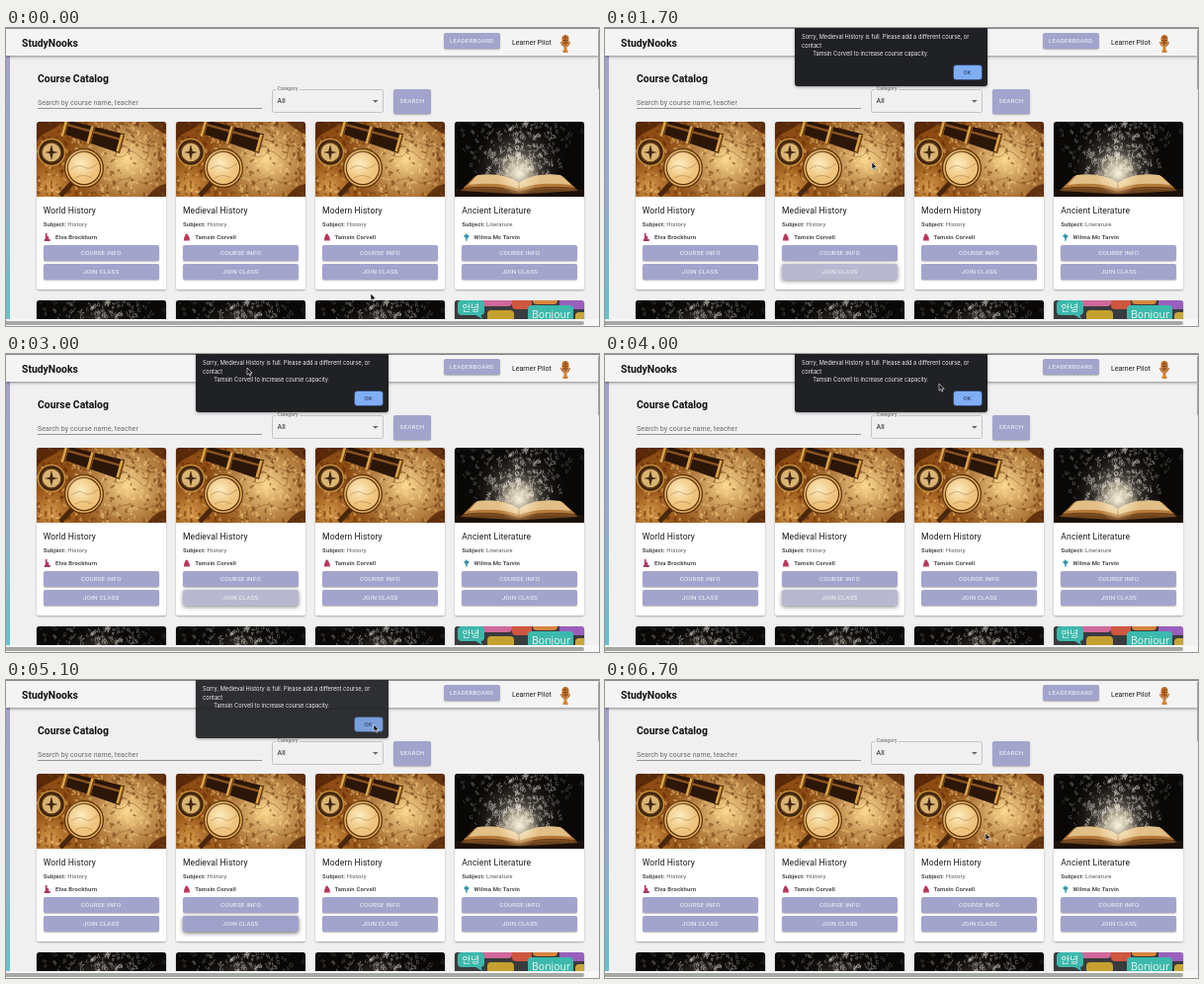
Recreate the animation shown at these times as an HTML page with a canvas. Size 600x302 px, loop 6.8 s.

```html
<!DOCTYPE html>
<html lang="en">
<head>
<meta charset="utf-8">
<title>Course catalog</title>
<style>
html, body { margin: 0; width: 100%; height: 100%; overflow: hidden; background: #f0f0f0; }
#stage { position: absolute; left: 0; top: 0; width: 600px; height: 302px; overflow: hidden;
  background: #f0f0f0; font-family: Roboto, "Liberation Sans", sans-serif; color: #1c1c1c; }
#stage div, #stage canvas, #stage svg { position: absolute; box-sizing: border-box; }
.t { white-space: pre; line-height: 10px; height: 10px; }
.head { left: 0; top: 0; width: 600px; height: 28px; background: #f4f4f4;
  border-top: 1px solid #8d8d8d; box-shadow: 0 1px 3px rgba(0,0,0,.45); }
.side { left: 0; top: 28px; width: 4px; height: 267px;
  background: linear-gradient(#a3a2cc, #97abd0 50%, #62c2cd); }
.h { font-size: 10.4px; font-weight: 700; color: #111; }
.btn { background: #a3a4cc; color: #f6f6fc; border-radius: 2px; display: flex;
  align-items: center; justify-content: center; font-size: 6.25px;
  letter-spacing: .0286em; box-shadow: 0 1px 1.5px rgba(0,0,0,.28); }
.btn.hover { background: #9a9bc5; box-shadow: 0 1px 3px rgba(0,0,0,.5); }
.btn.ripple { background: #b8b8d0; box-shadow: 0 1.5px 4px rgba(0,0,0,.45); }
.btn.focus { background: #a0a1ca; box-shadow: 0 1.5px 4px rgba(0,0,0,.55); }
.card { width: 131px; height: 170px; background: #fff; border-radius: 2.5px; overflow: hidden; }
.cardbox { width: 131px; height: 170px; border-radius: 2.5px; box-shadow: 0 1px 2px rgba(0,0,0,.32); }
.title { font-size: 8.6px; letter-spacing: .12px; }
.small { font-size: 6px; letter-spacing: .12px; color: #565656; }
.small b { color: #4c4c4c; }
.field { font-size: 7px; letter-spacing: .09px; }
.select { left: 268.5px; top: 62px; width: 113px; height: 24px; border: 1px solid #c4c4c4; border-radius: 2.5px; }
#dialog { left: 192px; top: 0; width: 195px; height: 58.5px; background: #202124;
  border-radius: 0 0 3px 3px; box-shadow: 0 1px 3px rgba(0,0,0,.35); color: #eee; }
#dialog .t { font: 5.7px/10px Inter, "Open Sans", sans-serif; }
#ok { left: 160.5px; top: 38px; width: 28px; height: 14px; border-radius: 2.5px; background: #80aef5;
  box-shadow: 0 0 0 .7px #3f5f93; color: #20304c; font-size: 6px; line-height: 14px; text-align: center; }
#ok.down { background: #7299d8; }
.foot { left: 0; top: 295px; width: 600px; height: 7px; background: #f7f7f7; }
.thumb { background: #a6a8a6; border-radius: 2px; }
#arrow, #hand { left: 0; top: 0; overflow: visible; }
</style>
</head>
<body>
<div id="stage"></div>
<script>
const stage = document.getElementById('stage');
const box = (cls, x, y, w, h, inner = '', extra = '') =>
  `<div class="${cls}" style="left:${x}px;top:${y}px;width:${w}px;height:${h}px" ${extra}>${inner}</div>`;
// Text is placed by its baseline.
const text = (cls, x, base, s, style = '') =>
  `<div class="t ${cls}" style="left:${x}px;top:${base - 7.5}px;${style}">${s}</div>`;

const courses = [
  ['World History', 'History', 'Elva Brockhurn', 'map'],
  ['Medieval History', 'History', 'Tamsin Corvell', 'map'],
  ['Modern History', 'History', 'Tamsin Corvell', 'map'],
  ['Ancient Literature', 'Literature', 'Wilma Mc Tarvin', 'book'],
];
const cardX = i => 30.7 + i * 141.2;
const figures = [
  '<path d="M2 0h2v3l2 1v3h1v2H1V7l1-1z" fill="#b8385f"/><path d="M1 7h7v1.5H1z" fill="#a03458"/>',
  '<path d="M4 .5q2 0 2 2 1.8 1.5 1.8 5.8H1q0-4 1.5-5.8Q2.5.5 4 .5z" fill="#c03a5c"/><path d="M2 5h5v1H2z" fill="#903050"/>',
  '<path d="M4 0l1.5 2L8 3 5.5 5.5 5 9H4L3.5 5.5 1 3l2-1z" fill="#2b9aa3"/><path d="M3.5 3h2v2h-2z" fill="#5a7fb8"/>',
];

function cardHtml([title, subject, teacher, photo], i) {
  const figure = figures[[0, 1, 1, 2][i]];
  return box('cardbox', cardX(i), 95, 131, 170) + box('card', cardX(i), 95, 131, 170,
    `<canvas data-photo="${photo}" width="131" height="76" style="left:0;top:0"></canvas>` +
    text('title', 7, 92.8, title) +
    text('small', 7, 106.6, `<b>Subject:</b> ${subject}`) +
    `<svg width="8" height="8" viewBox="0 0 9 9" style="left:7.5px;top:113px">${figure}</svg>` +
    text('small', 19.3, 119, `<b>${teacher}</b>`) +
    box('btn', 7, 125, 117, 16, 'COURSE INFO') +
    box('btn', 7, 144, 117, 16, 'JOIN CLASS', i === 1 ? 'id="join"' : ''));
}

const lowerCard = (_, i) => box('cardbox', cardX(i), 276, 131, 170) + box('card', cardX(i), 276, 131, 170,
  `<canvas data-photo="${i < 3 ? 'book' : 'talk'}" width="131" height="76" style="left:0;top:0"></canvas>`);

stage.innerHTML =
  '<div class="side"></div><div class="head"></div>' +
  text('h', 16, 18, 'StudyNooks') +
  box('btn', 442.5, 4.6, 57.5, 16, 'LEADERBOARD') +
  text('', 512, 17.3, 'Learner Pilot', 'font-size:7.05px') +
  `<svg width="14" height="20" style="left:559px;top:6px">
    <rect x="3.5" y="1" width="7" height="11" rx="3.5" fill="#cf7a2a"/>
    <path d="M4 4h6M4 6.5h6M4 9h6M7 1v11" stroke="#7d4219" stroke-width=".8"/>
    <path d="M2.5 8q1 5 4.5 5t4.5-5" fill="none" stroke="#a85b20" stroke-width="1.1"/>
    <path d="M5.5 12.5h3v4h1V19h-5v-2.500h1z" fill="#d5812f"/></svg>` +
  text('h', 32, 54.4, 'Course Catalog') +
  text('field', 32, 78, 'Search by course name, teacher', 'color:#696969') +
  '<div style="left:32px;top:81px;width:227px;height:1px;background:#949494"></div>' +
  '<div class="select"></div>' +
  text('', 273, 63.7, 'Category', 'font-size:5.25px;color:#666;background:#f0f0f0;padding:0 1.5px') +
  text('field', 274.5, 76.8, 'All') +
  '<svg width="6" height="3" style="left:371px;top:73px"><path d="M0 0h5.6L2.8 2.8z" fill="#666"/></svg>' +
  box('btn', 392, 62, 38, 24.5, 'SEARCH') +
  courses.map(cardHtml).join('') + courses.map(lowerCard).join('') +
  '<div class="foot"></div>' +
  box('thumb', 598.5, 2, 1.5, 60) + box('thumb', -2, 297, 587, 3.5) +
  `<div id="dialog">${
    text('', 7, 11.3, 'Sorry, Medieval History is full. Please add a different course, or')}${
    text('', 7, 20.1, 'contact')}${
    text('', 18.3, 28.9, 'Tamsin Corvell to increase course capacity.')}<div id="ok">OK</div></div>` +
  `<svg id="arrow" width="8" height="10"><path d="M0 0V7.2L1.7 5.7 2.8 8.2 4 7.7 2.9 5.3H5.2z"
    fill="#111" stroke="#fff" stroke-width=".6"/></svg>
  <svg id="hand" width="9" height="10"><path d="M1.8.5q.9-.4 1 .6v2.500l2.500.4q1.500.3 1.300 1.800L6 8.500H2.500L.2 5.500q.3-1 1.500-.1z"
    fill="#fff" stroke="#111" stroke-width=".7"/></svg>`;

function seeded(seed) {
  return () => (seed = (seed * 16807) % 2147483647) / 2147483647;
}
function disc(c, x, y, r, fill, line, width) {
  c.beginPath();
  c.arc(x, y, r, 0, 7);
  if (fill) { c.fillStyle = fill; c.fill(); }
  if (line) { c.strokeStyle = line; c.lineWidth = width; c.stroke(); }
}
function shape(c, fill, d) {
  c.fillStyle = fill;
  c.fill(new Path2D(d));
}
function stroke(c, color, width, d) {
  c.strokeStyle = color;
  c.lineWidth = width;
  c.stroke(new Path2D(d));
}
function glow(c, x, y, r, inner, outer) {
  const g = c.createRadialGradient(x, y, 0, x, y, r);
  g.addColorStop(0, inner);
  g.addColorStop(1, outer);
  c.fillStyle = g;
  c.fillRect(0, 0, 131, 76);
}

const photos = {
  map(c) {
    const rnd = seeded(41);
    c.fillStyle = '#c98532';
    c.fillRect(0, 0, 131, 76);
    glow(c, 92, 38, 60, 'rgba(255,222,150,.95)', 'rgba(115,52,6,.7)');
    glow(c, 14, 66, 34, 'rgba(250,195,105,.7)', 'rgba(200,120,40,0)');
    for (let i = 0; i < 420; i++) {
      const x = rnd() * 131, y = rnd() * 76, edge = Math.hypot((x - 88) / 60, (y - 38) / 42);
      c.fillStyle = rnd() < .25 + edge * .35 ? 'rgba(92,38,4,.45)' : 'rgba(255,222,145,.4)';
      c.beginPath();
      c.ellipse(x, y, .6 + rnd() * 2.6, .5 + rnd() * 1.2, rnd() * 3, 0, 7);
      c.fill();
    }
    stroke(c, 'rgba(108,57,15,.55)', .7, 'M77 34q10 4 14-2t13 3 9-4 17 1M76 65q14-12 25-5t29-8M92 3q4 16 17 20t21-3');
    shape(c, 'rgba(70,28,4,.7)', 'M112 0h19v13q-9-4-19-13zM112 76q9-12 19-13v13zM0 0h30L4 14 0 20z');
    // Spyglass
    c.save();
    c.translate(29, -2);
    c.rotate(.27);
    shape(c, '#2b1608', 'M0 0L62-2V18L0 14z');
    shape(c, '#8a5320', 'M0 3H62V5.500H0z');
    for (const x of [0, 27, 58]) {
      shape(c, '#dba548', `M${x}-1h4v18h-4z`);
      shape(c, '#6c3b11', `M${x + 2.5}-1h1.500v18h-1.500z`);
    }
    c.restore();
    // Compass
    disc(c, 15, 31, 13.5, '#3c210d', '#c08a38', 1.6);
    disc(c, 15, 31, 10, '#d9b472', '#5e3915', 1.5);
    shape(c, '#422713', 'M15 23l2 8-2 8-2-8zM8 31l7-1.500 7 1.500-7 1.500z');
    // Magnifier
    stroke(c, '#4a270c', 5, 'M36 62L24 75');
    disc(c, 48, 47, 18, '#eec27a', '#5c310d', 4);
    disc(c, 48, 47, 18, null, '#e0b05a', 1.6);
    glow(c, 45, 43, 16, 'rgba(255,245,208,.85)', 'rgba(255,241,200,0)');
    stroke(c, 'rgba(130,78,28,.5)', .7, 'M35 48q8-6 13-2t14-4M39 57q8-5 17 0');
  },
  book(c) {
    const rnd = seeded(77);
    c.fillStyle = '#090807';
    c.fillRect(0, 0, 131, 76);
    glow(c, 64, 46, 50, 'rgba(215,203,188,.7)', 'rgba(25,20,16,0)');
    c.textAlign = 'center';
    for (let i = 0; i < 330; i++) {
      const y = rnd() * 56, spread = rnd() + rnd() - 1, x = 65 + spread * (72 - y * .5);
      const near = Math.max(0, 1 - Math.hypot(x - 65, y - 40) / 70);
      c.fillStyle = `rgba(248,243,234,${.22 + near * .68})`;
      c.font = `${2.5 + rnd() * 4}px "Noto Serif", serif`;
      c.save();
      c.translate(x, y);
      c.rotate((rnd() - .5) * 2);
      c.fillText(String.fromCharCode(65 + Math.floor(rnd() * 26) + (rnd() < .5 ? 32 : 0)), 0, 2);
      c.restore();
    }
    shape(c, '#1b100a', 'M0 68h131v8H0z');
    shape(c, '#6d431d', 'M6 70L20 56q27-4 45 6 18-10 45-6l15 14-53 3H59z');
    shape(c, '#b57a3b', 'M9 67L21 55q27-4 44 7 17-11 44-7l13 12q-35-4-57 4-22-8-56-4z');
    shape(c, '#e3bf88', 'M14 64L23 54q27-3 42 8 15-11 42-8l11 10q-33-4-53 4-20-8-51-4z');
    stroke(c, '#8d5724', .8, 'M65 62v9M10 69q33-4 55 3 22-7 56-3');
    glow(c, 65, 53, 22, 'rgba(255,250,230,.95)', 'rgba(255,235,190,0)');
  },
  talk(c) {
    c.fillStyle = '#3a3b3e';
    c.fillRect(0, 0, 131, 76);
    const bubble = (x, y, w, h, fill) => {
      c.fillStyle = fill;
      c.beginPath();
      c.roundRect(x, y, w, h, 4);
      c.fill();
    };
    bubble(27, -5, 31, 11, '#d0699b');
    bubble(33, 10, 27, 15, '#c4a02f');
    bubble(58, -4, 20, 13, '#d0563f');
    bubble(79, -5, 25, 9, '#d9853f');
    bubble(106, -4, 28, 13, '#9a5fbd');
    bubble(122, 12, 17, 13, '#c9a63a');
    bubble(3, 0, 27, 15, '#3cb9ac');
    shape(c, '#3cb9ac', 'M18 13h8l2 6z');
    bubble(74, 5, 46, 18, '#3cb9ac');
    c.fillStyle = '#f5f7f4';
    c.font = '300 9.5px "Noto Sans CJK KR", "Noto Sans CJK", sans-serif';
    c.fillText('안녕', 7.5, 10.5);
    c.font = '10.5px "Open Sans", sans-serif';
    c.fillText('Bonjour', 78, 17.5);
  },
};
for (const canvas of stage.querySelectorAll('canvas')) photos[canvas.dataset.photo](canvas.getContext('2d'));

const LOOP = 6800, STEP = 100;
const path = [ // time, x, y of the pointer tip
  [0, 369, 269], [100, 369, 269], [700, 258, 242], [1000, 258, 242], [1700, 270, 136],
  [2300, 222, 13], [3000, 244, 14], [3500, 300, 16], [4000, 338, 30], [4800, 372, 45],
  [5200, 372, 45], [6700, 385, 155], [LOOP, 385, 155],
];
function pointer(t) {
  const i = path.findIndex((p, k) => k > 0 && t <= p[0]);
  const [a, b] = [path[i - 1], path[i]];
  const u = (t - a[0]) / (b[0] - a[0]), e = u * u * (3 - 2 * u);
  return [a[1] + (b[1] - a[1]) * e, a[2] + (b[2] - a[2]) * e];
}
function dialogAlpha(t) {
  if (t < 1000 || t >= 5300) return 0;
  if (t >= 5200) return .5;
  return t >= 5100 ? .93 : 1;
}

const [join, dialog, ok, arrow, hand] = ['join', 'dialog', 'ok', 'arrow', 'hand'].map(id => document.getElementById(id));
function draw(t) {
  const [x, y] = pointer(t);
  const over = t < 1000 && x > 179 && x < 296 && y > 239 && y < 256;
  arrow.style.transform = `translate(${x}px,${y}px)`;
  hand.style.transform = `translate(${x - 1}px,${y - 1}px)`;
  arrow.style.visibility = over ? 'hidden' : 'visible';
  hand.style.visibility = over ? 'visible' : 'hidden';
  dialog.style.opacity = dialogAlpha(t);
  ok.className = t >= 5000 ? 'down' : '';
  const state = t >= 1000 && t < 5100 ? 'ripple' : t >= 5100 && t < 5400 ? 'focus' : over ? 'hover' : '';
  join.className = 'btn ' + state;
}

const start = performance.now();
function tick() {
  const t = (performance.now() - start) % LOOP;
  draw(Math.floor(t / STEP) * STEP);
  requestAnimationFrame(tick);
}
tick();
</script>
</body>
</html>
```
